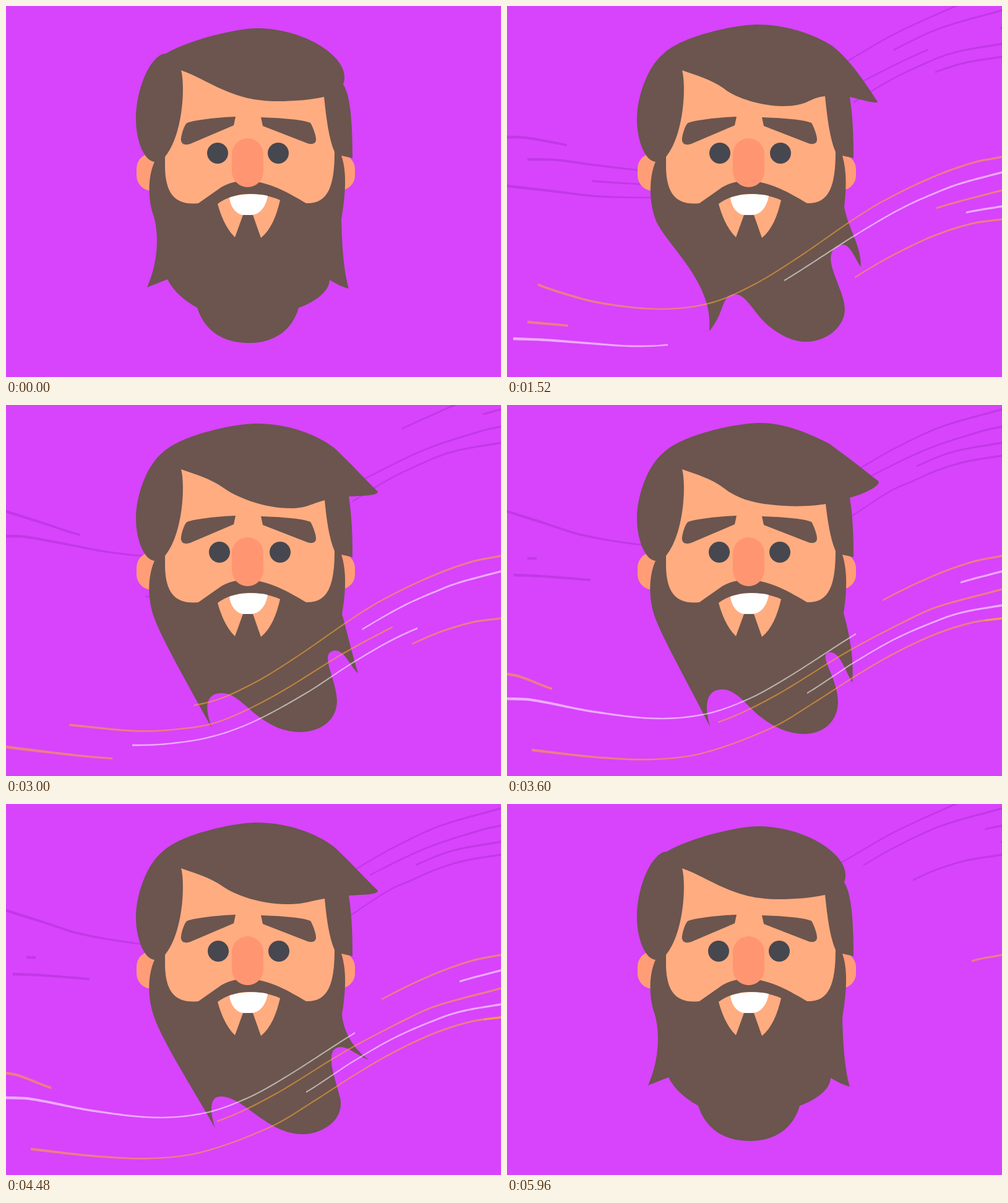
Write an HTML page with a canvas that moves like this. It is 800x600 px and loops after 6 s.

```html
<!DOCTYPE html>
<html lang="en">
<head>
<meta charset="utf-8">
<title>Bearded man in the wind</title>
<style>
  html, body { margin: 0; width: 100%; height: 100%; overflow: hidden; background: #d744fb; }
  canvas { display: block; width: 800px; height: 600px; }
</style>
</head>
<body>
<canvas id="stage" width="800" height="600"></canvas>
<script>
const ctx = document.getElementById('stage').getContext('2d');
const LOOP = 6000, FRAME = 40, CYCLE = 11;
const BG = '#d744fb', BROWN = '#6b554e', SKIN = '#ffac80', ROSE = '#ff9671';
const DARK = '#c238e6', WHITE = 'rgba(255,255,255,.55)', ORANGE = 'rgba(255,168,50,.57)';

// Linear track through [time, value] pairs, held at both ends
function track(keys, s) {
  if (s <= keys[0][0]) return keys[0][1];
  for (let i = 1; i < keys.length; i++) {
    const [a, x] = keys[i - 1], [b, y] = keys[i];
    if (s <= b) return x + (y - x) * (s - a) / (b - a);
  }
  return keys[keys.length - 1][1];
}

// Smooth height of a curve through points sorted by x
function curveY(pts, x) {
  const slope = i => {
    const a = pts[Math.max(0, i - 1)], b = pts[Math.min(pts.length - 1, i + 1)];
    return (b[1] - a[1]) / (b[0] - a[0]);
  };
  let i = 0;
  while (i < pts.length - 2 && x > pts[i + 1][0]) i++;
  const [x0, y0] = pts[i], [x1, y1] = pts[i + 1];
  const w = x1 - x0, t = (x - x0) / w, u = 1 - t;
  return u * u * (1 + 2 * t) * y0 + t * t * (3 - 2 * t) * y1
    + w * t * u * (u * slope(i) - t * slope(i + 1));
}

const pairs = text => text.split(' ').map(p => p.split(',').map(Number));
const gust = (color, path, head, tail) =>
  ({ color, path: pairs(path), head: pairs(head), tail: pairs(tail) });

// Curve points, then head and tail as step,x
const backGusts = [
  gust(DARK, '0,172 60,191 120,210 216,226 300,232', '-5,0 0,300', '1,0 4,240'),
  gust(DARK, '0,212 30,213 97,225 160,237 219,244 300,250', '3.6,0 4,25 5,97 8,300', '9,0 11,99 12,260'),
  gust(DARK, '33,248 80,249 140,257 210,265 300,272', '.8,33 1,48 4,300', '5,33 9,300'),
  gust(DARK, '11,275 58,277 135,283 213,288 300,292', '-.6,11 0,58 1,135 4,300', '4,11 5,138 6,300'),
  gust(DARK, '0,291 70,299 137,307 173,309 232,310 300,310', '2,0 4,173 5,300', '5,0 9,300'),
  gust(DARK, '540,95 625,46 725,0 740,-6', '13,540 15,740', '16,540 22,740'),
  gust(DARK, '540,121 576,99 625,71 700,36 800,7', '8,540 10.5,800', '14,526 15,576 16,625 19.6,800'),
  gust(DARK, '540,142 588,115 680,71 772,41 800,35', '4,540 5,680 6,800', '11,527 12,588 15,772 16,797 17,800'),
  gust(DARK, '540,168 557,158 612,124 662,99 720,76 800,61', '2,540 4,792 5,800', '10,560 11,612 12,662 15,798 16,800'),
  gust(DARK, '540,190 558,179 620,139 656,123 692,107 740,92 800,82', '8,540 11,800', '11,540 12,555 15,656 16,692 19,800')
];
const frontGusts = [
  gust(ORANGE, '0,435 20,439 73,459 150,480 250,490 330,480 400,450 470,407 557,347 607,316 685,278 751,254 800,244',
    '-.4,0 0,19 1,73 4,685 4.8,800', '4,0 5,50 11,557 12,607 15,751 16,800'),
  gust(WHITE, '0,475 40,477 140,496 240,507 320,500 387,477 448,444 564,370 640,326 703,298 733,287 800,269',
    '-3,0 0,387 1,564 2.5,800', '1,0 4,360 5,448 11,703 12,733 14.6,800'),
  gust(ORANGE, '33,511 99,517 207,527 270,525 341,513 430,472 550,399 645,349 694,327 800,298',
    '-9,33 -7,99 -6,99 -2,800', '-5,33 0,207 1,341 4,645 5,694 8,800'),
  gust(WHITE, '10,538 60,540 140,546 200,550 260,548 330,537 398,513 485,466 560,417 630,377 705,345 742,334 800,324',
    '-9,10 -7,260 -6,260 -2,800', '-6,10 0,398 1,485 4,705 5,742 8,800'),
  gust(ORANGE, '0,553 40,558 150,570 240,573 320,562 430,521 500,479 562,439 620,405 689,372 751,352 800,345',
    '-4,0 0,689 .8,800', '0,0 1,40 4,500 5,562 11,751 12,772 14,800')
];

const strokeWidth = x =>
  2.4 + 2.2 * Math.max(0, 1 - x / 250) + 0.9 * Math.max(0, (x - 500) / 300);

function drawGust({ color, path, head, tail }, s) {
  const from = track(tail, s), to = track(head, s);
  if (to - from < 1) return;
  const n = Math.ceil((to - from) / 6), top = [], bottom = [];
  for (let i = 0; i <= n; i++) {
    const x = from + (to - from) * i / n, y = curveY(path, x), h = strokeWidth(x) / 2;
    top.push([x, y - h]);
    bottom.unshift([x, y + h]);
  }
  ctx.beginPath();
  for (const p of [...top, ...bottom]) ctx.lineTo(...p);
  ctx.fillStyle = color;
  ctx.fill();
}

function drawGusts(list, step) {
  for (const g of list)
    for (let m = -1; m <= 10; m++) drawGust(g, step - m * CYCLE);
}

// The wind skips a step at three moments
const windStep = frame => frame - 21 - [30, 49, 146].filter(f => frame >= f).length;

// Outlines share one structure, so that their numbers can be blended
const hair = crown => 'M240,252 C222,250 210,215 210,184 ' + crown + ' 560,246 L542,242 L530,262 L257,262Z';
const face = fringe => 'M283,104 C290,130 286,209 257,244 L257,262 C258,305 275,323 311,319 L348,293 '
  + 'C365,283 380,283 391,283 C424,283 458,303 485,319 C520,320 531,293 531,236 C522,215 518,185 ' + fringe + ' 283,104Z';
const beard = edge => 'M240,252 C231,272 ' + edge + ' 542,242 L530,215 L257,215Z';

const crownMid = hair('C210,145 228,97 253,77 C283,48 370,30 405,30 C460,30 505,50 530,69 C553,90 580,120 600,139 C606,147 570,147 554,148 C559,180 560,210');
const crownLow = hair('C210,145 228,97 253,77 C283,48 370,30 405,30 C455,30 500,48 525,64 C556,88 580,126 599,155 C599,159 570,151 554,147 C559,180 560,210');
const crownHigh = hair('C210,145 228,97 253,77 C283,48 370,29 410,29 C450,29 490,47 520,62 C548,82 577,105 600,123 C606,129 580,143 554,150 C559,180 560,210');
const fringeMid = face('515,154 C492,160 486,167 460,167 C415,167 370,148 350,133 C330,119 306,112');

const poses = {
  rest: {
    eye: 0,
    hair: hair('C210,130 236,77 258,77 C300,53 375,36 405,36 C480,36 547,79 547,114 C547,121 546,124 545,127 C557,145 560,190'),
    face: face('514,147 C490,152 465,154 440,154 C400,154 375,146 350,135 C327,125 306,112'),
    beard: beard('228,303 237,335 C247,362 248,410 228,455 C239,451 250,446 261,442 C271,462 288,476 309,488 C321,525 350,545 393,545 C435,545 463,523 473,488 C497,480 523,462 523,443 C535,450 545,455 554,457 C546,430 543,390 542,345 C548,310 552,270')
  },
  a: {
    eye: 3, hair: crownMid, face: fringeMid,
    beard: beard('227,305 238,340 C250,375 290,445 333,523 C325,500 316,466 349,466 C372,466 388,490 410,505 C430,520 452,529 474,529 C512,529 535,507 535,478 C535,445 504,399 532,397 C548,397 558,425 569,434 C560,405 552,370 543,338 C549,305 551,270')
  },
  b: {
    eye: 2, hair: crownLow,
    face: face('514,146 C488,148 488,162 445,162 C415,162 370,150 350,133 C330,119 306,112'),
    beard: beard('227,315 242,350 C262,390 335,450 327,526 C353,495 345,468 368,466 C388,466 400,500 425,519 C445,535 465,543 483,543 C515,543 546,520 546,490 C546,455 497,395 543,386 C555,386 563,410 572,422 C572,385 553,365 545,325 C548,300 550,270')
  },
  c: {
    eye: 3, hair: crownMid, face: fringeMid,
    beard: beard('227,305 238,340 C250,375 305,455 328,523 C328,490 325,462 351,462 C375,462 392,495 415,510 C435,524 455,532 474,532 C510,532 534,510 534,478 C534,445 503,398 526,397 C545,397 553,430 559,444 C565,410 553,365 544,335 C549,305 551,270')
  },
  d: {
    eye: 1, hair: crownHigh,
    face: face('515,160 C498,163 465,166 425,161 C395,158 370,150 350,134 C330,119 306,112'),
    beard: beard('227,305 238,340 C250,375 290,445 329,522 C322,500 315,460 348,460 C372,460 390,490 412,506 C432,521 455,532 480,532 C515,532 535,508 535,480 C535,440 500,402 522,400 C538,399 548,432 558,449 C561,415 555,375 544,337 C549,305 551,270')
  },
  e: {
    eye: 1, hair: crownMid,
    face: face('515,153 C490,157 480,163 450,162 C415,162 370,148 350,133 C330,119 306,112'),
    beard: beard('227,305 238,340 C250,380 305,465 338,524 C333,508 324,473 347,473 C370,473 395,497 415,510 C438,526 458,534 480,534 C510,534 548,512 540,475 C533,445 512,396 540,393 C556,393 572,410 586,413 C565,400 545,370 543,340 C549,305 551,270')
  }
};

const schedule = [
  [0, 'rest'], [240, 'rest'], [600, 'd'], [840, 'a'], [1180, 'd'], [1520, 'b'], [1820, 'e'],
  [2110, 'd'], [2400, 'c'], [2700, 'b'], [3000, 'a'], [3300, 'e'], [3600, 'd'], [3900, 'b'],
  [4200, 'c'], [4480, 'e'], [4800, 'd'], [5050, 'b'], [5300, 'a'], [5720, 'rest'], [LOOP, 'rest']
];

function blend(a, b, k) {
  const to = b.match(/\d+/g);
  let i = 0;
  return a.replace(/\d+/g, n => (+n + (to[i++] - n) * k).toFixed(2));
}

function poseAt(t) {
  const i = schedule.findIndex(([time]) => time > t);
  const [t0, from] = schedule[i - 1], [t1, to] = schedule[i];
  const u = (t - t0) / (t1 - t0), k = u * u * (3 - 2 * u);
  const a = poses[from], b = poses[to];
  const pose = { eye: a.eye + (b.eye - a.eye) * k };
  for (const part of ['hair', 'face', 'beard']) pose[part] = blend(a[part], b[part], k);
  return pose;
}

function fill(color, d) {
  ctx.fillStyle = color;
  ctx.fill(new Path2D(d));
}

function pill(color, x, y, w, h, r) {
  ctx.fillStyle = color;
  ctx.beginPath();
  ctx.roundRect(x, y, w, h, r);
  ctx.fill();
}

function drawHead(pose) {
  pill('#ff9e76', 211, 238, 50, 61, 25);
  pill('#ff9e76', 515, 240, 49, 58, 24);
  fill(BROWN, pose.beard);
  fill(BROWN, pose.hair);
  fill(SKIN, pose.face);
  // Brows
  fill(BROWN, 'M371,179 C345,180 305,184 293,189 C288,191 282,212 283,218 C285,226 293,225 300,222 L368,193Z');
  fill(BROWN, 'M412,180 C440,181 478,183 492,189 C496,195 502,212 501,217 C500,224 492,224 487,222 L415,194Z');
  for (const x of [342, 440]) pill('#47474f', x - 17 + pose.eye, 221, 34, 34, 17);
  pill(ROSE, 365, 214, 51, 79, 25.5);
  // Mouth
  fill(SKIN, 'M342,320 C355,310 375,304 391,304 C415,304 435,310 443,314 C437,340 428,362 412,375 L399,338 L383,338 L370,374 C355,360 346,335 342,320Z');
  fill('#fff', 'M361,310 C375,304 405,302 423,307 C420,325 410,338 395,338 L385,338 C372,338 363,325 361,310Z');
}

function render(now) {
  const frame = Math.floor((now % LOOP) / FRAME), step = windStep(frame);
  ctx.fillStyle = BG;
  ctx.fillRect(0, 0, 800, 600);
  drawGusts(backGusts, step);
  drawHead(poseAt(frame * FRAME));
  drawGusts(frontGusts, step);
}

const start = performance.now();
function loop() {
  render(performance.now() - start);
  requestAnimationFrame(loop);
}
loop();
</script>
</body>
</html>
```
